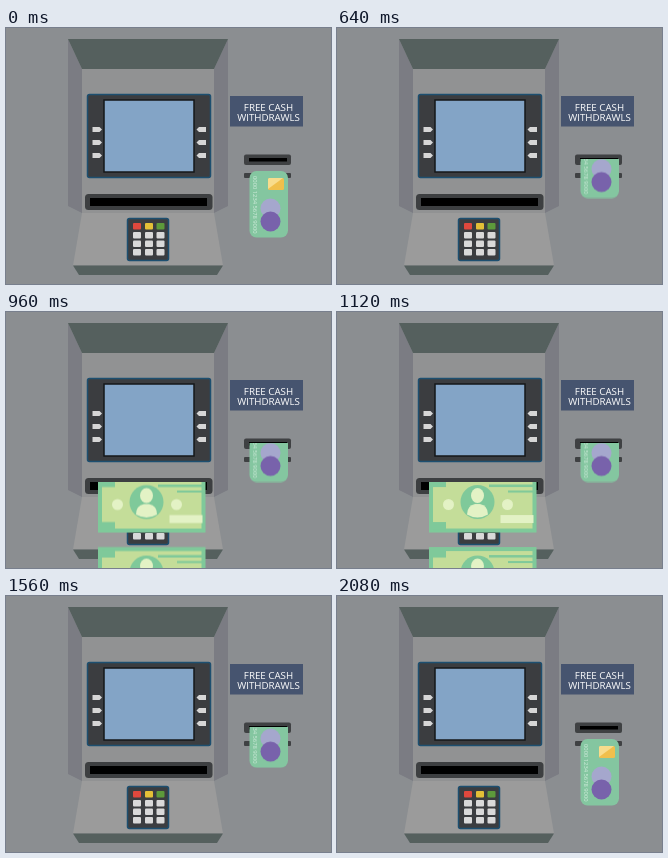
Animation of 325x256 px, one loop 2.12 s. Source, as an HTML page without scripts:

```html
<!DOCTYPE html>
<html lang="en">
<head>
<meta charset="utf-8">
<title>Cash machine</title>
<style>
  html, body { margin: 0; width: 100%; height: 100%; overflow: hidden; background: #8b8e91; }
  svg { display: block; width: 100vw; height: 100vh; }
  .card, .cash { animation: 2120ms -4ms infinite; }
  .card { animation-name: card; }
  .cash { animation-name: cash; }
  .sign { font: 9.75px "Open Sans", "Noto Sans", sans-serif; fill: #fff; text-anchor: middle; }
  .digits { font: 5.8px "Open Sans", "Noto Sans", sans-serif; fill: #d3eddd; }

  /* in 40–660 ms, out 1480–2080 ms */
  @keyframes card {
    0%, 1.887% { transform: translateY(0); animation-timing-function: ease-in-out; }
    31.132% { transform: translateY(-39.5px); }
    69.811% { transform: translateY(-39.5px); animation-timing-function: ease-in-out; }
    98.113%, 100% { transform: translateY(0); }
  }
  /* notes run 680–1520 ms in 40 ms ticks */
  @keyframes cash {
    0% { transform: translateY(41.2px); }
    32.0755% { transform: translateY(41.2px); animation-timing-function: steps(21); }
    71.698%, 100% { transform: translateY(411.2px); }
  }
</style>
</head>
<body>
<svg viewBox="0 0 325 256" preserveAspectRatio="none">
  <defs>
    <clipPath id="cardArea"><rect x="230" y="131" width="70" height="125"/></clipPath>
    <clipPath id="cashArea"><rect x="80" y="170" width="130" height="86"/></clipPath>
    <path id="button" d="M0 0h7l2.5 2.5L7 5H0z" fill="#d6d6d6"/>
    <g id="buttons">
      <use href="#button" y="99"/>
      <use href="#button" y="112"/>
      <use href="#button" y="125"/>
    </g>
    <rect id="key" width="8" height="6.5" rx="1"/>
    <g id="keyRow" fill="#d9d9d9">
      <use href="#key" x="127"/>
      <use href="#key" x="139"/>
      <use href="#key" x="150.5"/>
    </g>
    <g id="note">
      <rect width="107.5" height="56" fill="#7fc99a"/>
      <rect x="4" y="4" width="99.5" height="48" fill="#c4dd99"/>
      <path d="M4 3h13v7.500H4zM4 45.500h13V53H4zM60 8h44v2.500H60zM79 14h25v2H79z" fill="#7fc99a"/>
      <rect x="71.500" y="38.500" width="33" height="8" fill="#e3f2c5"/>
      <circle cx="19.500" cy="28" r="5.500" fill="#e3f2c5"/>
      <circle cx="78.500" cy="28" r="5.500" fill="#e3f2c5"/>
      <circle cx="48.500" cy="25.500" r="17" fill="#7fc99a"/>
      <ellipse cx="48.500" cy="19" rx="6.500" ry="7.500" fill="#e3f2c5"/>
      <path d="M38 38q0-9 8-10.500h5q8 1.500 8 10.500q-10.500 6-21 0z" fill="#e3f2c5"/>
    </g>
  </defs>

  <rect width="325" height="256" fill="#8b8e91"/>

  <!-- housing -->
  <path d="M62 11L76 41V185L62 178zM222 11L208 41V185L222 178z" fill="#7b7c83"/>
  <path d="M76 41H208V185H76z" fill="#919293"/>
  <path d="M62 11H222L208 41H76z" fill="#55605e"/>
  <path d="M76 185H208L217 237.500H67z" fill="#9b9b9b"/>
  <path d="M67 237.500H217L211 247H73z" fill="#55605e"/>

  <!-- screen -->
  <rect x="81.500" y="66.500" width="123" height="83" rx="2" fill="#3b3d40" stroke="#1d4f70" stroke-width="1.500"/>
  <rect x="98" y="72" width="90" height="72" fill="#83a4c6" stroke="#151719" stroke-width="1.500"/>
  <use href="#buttons" x="86.500"/>
  <use href="#buttons" transform="matrix(-1 0 0 1 200 0)"/>

  <!-- cash slot and keypad -->
  <rect x="79" y="166" width="127.500" height="16" rx="3.500" fill="#3d3f41"/>
  <rect x="84" y="170" width="117" height="8" fill="#000"/>
  <rect x="121.500" y="190.500" width="41" height="42" rx="2" fill="#3b3d40" stroke="#1d4f70" stroke-width="1.500"/>
  <use href="#key" x="127" y="195" fill="#e0483d"/>
  <use href="#key" x="139" y="195" fill="#e3bf37"/>
  <use href="#key" x="150.500" y="195" fill="#5d9a3b"/>
  <use href="#keyRow" y="204"/>
  <use href="#keyRow" y="212.500"/>
  <use href="#keyRow" y="221"/>

  <!-- sign -->
  <rect x="224" y="68" width="73" height="30.500" fill="#46546f"/>
  <g class="sign">
    <text x="262.500" y="82.500">FREE CASH</text>
    <text x="262.500" y="92.500">WITHDRAWLS</text>
  </g>

  <!-- card slot -->
  <rect x="238" y="126.500" width="47" height="10.500" rx="2" fill="#3f4143"/>
  <rect x="243" y="130" width="38" height="3.500" fill="#000"/>
  <rect x="238" y="145" width="47" height="5" rx="1" fill="#3f4143"/>

  <g clip-path="url(#cardArea)">
    <g class="card">
      <rect x="243.500" y="143" width="38.500" height="66.500" rx="7" fill="#84c6a0"/>
      <rect x="262" y="150" width="16" height="12" rx="1.500" fill="#f0bf4c"/>
      <path d="M263 150H277L262 161V151z" fill="#f8dc8c"/>
      <circle cx="264.500" cy="180.500" r="10" fill="#a5a7cd"/>
      <circle cx="264.500" cy="193.500" r="10" fill="#7862ab"/>
      <text class="digits" transform="translate(246.500 148) rotate(90)">0000 1234 5678 9000</text>
    </g>
  </g>

  <g clip-path="url(#cashArea)">
    <g class="cash">
      <use href="#note" x="92" y="70.500"/>
      <use href="#note" x="92"/>
      <use href="#note" x="92" y="-70.500"/>
      <use href="#note" x="92" y="-141"/>
    </g>
  </g>
</svg>
</body>
</html>
```
